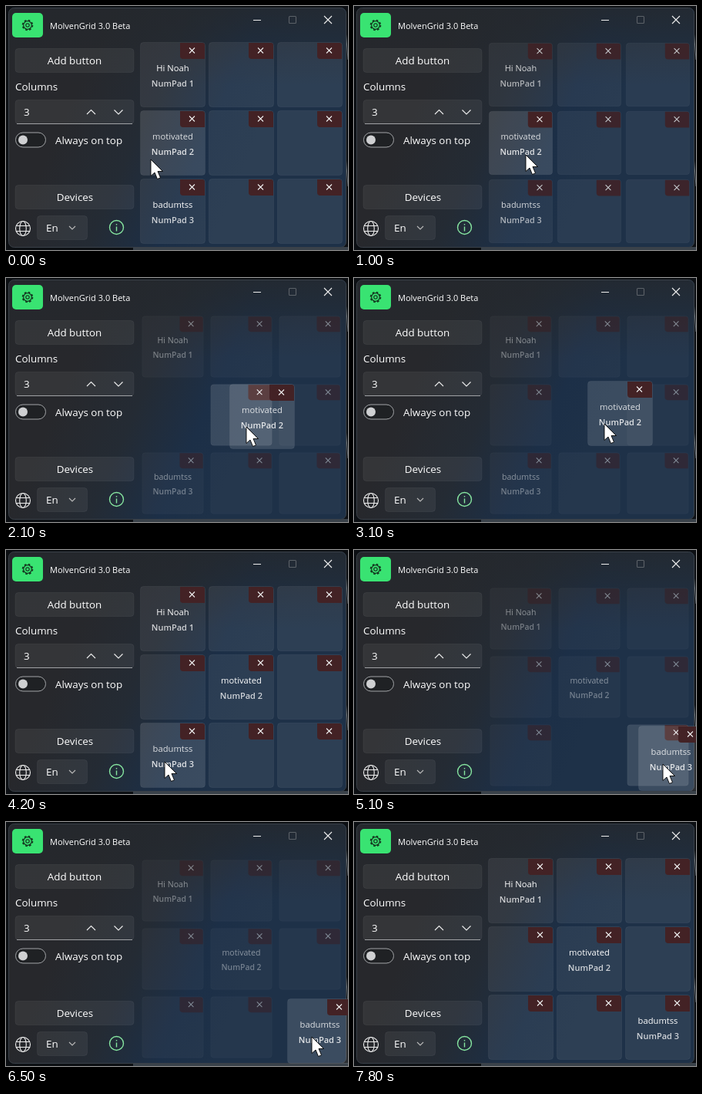
These frames come from a looping animation (444 by 318 pixels, 8 s). An HTML page:

```html
<!DOCTYPE html>
<html lang="en">
<head>
<meta charset="utf-8">
<title>Button deck</title>
<style>
  html, body { margin: 0; width: 100%; height: 100%; overflow: hidden; background: #0c0f13; }
  svg { display: block; font-family: "Open Sans", "Noto Sans", sans-serif; fill: #fff; }
  .mid { text-anchor: middle; }
  .ui { font-size: 13.4px; }
  .box { fill: #fff; fill-opacity: .06; stroke: #fff; stroke-opacity: .05; }
  .line { fill: none; stroke: #eee; stroke-width: 1.1; }
  .tile text { font-size: 11.2px; text-anchor: middle; }
  .tile .key { font-size: 11px; font-weight: 600; }
</style>
</head>
<body>
<svg width="444" height="318" viewBox="0 0 444 318">
  <defs>
    <linearGradient id="bg" gradientUnits="userSpaceOnUse" x1="90" y1="112" x2="310" y2="208">
      <stop offset="0" stop-color="#27282c"/>
      <stop offset=".4" stop-color="#242b34"/>
      <stop offset=".75" stop-color="#1c2f47"/>
      <stop offset="1" stop-color="#1e3148"/>
    </linearGradient>
    <linearGradient id="top" x2="0" y2="1">
      <stop offset="0" stop-color="#24282d" stop-opacity=".8"/>
      <stop offset="1" stop-color="#24282d" stop-opacity="0"/>
    </linearGradient>
  </defs>

  <path d="M165 314H444V318H165Z" fill="#3a424a"/>
  <path d="M441 30L444 70M441 195L444 235" stroke="#6d757c"/>
  <rect x="3.5" y="2.5" width="438" height="312" rx="7" fill="url(#bg)" stroke="#3a4149"/>
  <rect x="4" y="3" width="437" height="100" rx="7" fill="url(#top)"/>

  <rect x="8" y="9" width="40" height="32" rx="5" fill="#39e372"/>
  <g fill="none" stroke="#14351f" transform="translate(28 25)">
    <circle r="5.3" stroke-width="1.2"/>
    <circle r="6.4" stroke-width="1.8" stroke-dasharray="2.6 2.427"/>
    <circle r="2.2" stroke-width="1.2"/>
  </g>
  <text x="57" y="30" font-size="11">MolvenGrid 3.0 Beta</text>
  <path class="line" d="M321 18.5H331M413 13L423 23M423 13L413 23"/>
  <rect class="line" x="367.500" y="13.500" width="9" height="9" rx="1" style="stroke:#5c6268"/>

  <g class="ui">
    <rect class="box" x="12" y="55.500" width="154" height="31" rx="4"/>
    <text class="mid" x="89" y="76">Add button</text>
    <text x="12" y="110">Columns</text>
    <rect class="box" x="12" y="122.500" width="154" height="31" rx="4"/>
    <path d="M14 153.500H164" stroke="#a0a2a5"/>
    <text x="23" y="143">3</text>
    <path class="line" d="M105 141L110.500 135.500L116 141M140.500 135.500L146 141L151.500 135.500"/>
    <rect x="12.500" y="165" width="39" height="19" rx="9.500" fill="#1f2124" stroke="#a3a5a8"/>
    <circle cx="22" cy="174.500" r="6" fill="#cfd0d2"/>
    <text x="64" y="180">Always on top</text>
    <rect class="box" x="12" y="233.500" width="154" height="31" rx="4"/>
    <text class="mid" x="89.500" y="254">Devices</text>
    <g class="line" transform="translate(22 290)">
      <circle r="9.500"/><ellipse rx="4.300" ry="9.500"/>
      <path d="M-8.800 -3.500H8.800M-8.800 3.500H8.800"/>
    </g>
    <rect class="box" x="40.500" y="273.500" width="65" height="31" rx="4"/>
    <text x="52" y="294">En</text>
    <path class="line" d="M82 287L86 291L90 287" style="stroke:#bbb"/>
    <g transform="translate(143.500 288.500)" stroke="#86e5a0" fill="none" stroke-width="1.400">
      <circle r="9"/><path d="M0 -1V5M0 -4.500V-3"/>
    </g>
  </g>

  <g id="tiles"></g>
  <path id="cursor" d="M0 0V21.500L5 17L8.500 25.500L12.500 23.800L9 15.500H15.500Z" stroke="#000" stroke-width=".9"/>
</svg>
<script>
const LOOP = 8000, STEP = 100, PITCH = 89, SIZE = 85;
const labels = { 0: ['Hi Noah', 1], 3: ['motivated', 2], 6: ['badumtss', 3] };

// Tile that is carried, its fade start, drop time, grab offset and columns travelled
const drags = [
  { id: 3, start: 900, drop: 3300, dx: 22, dy: 56, cols: 1 },
  { id: 6, start: 4400, drop: 6600, dx: 32, dy: 50, cols: 2 }
];
// When each displaced tile slides one column left
const slides = { 4: 2350, 7: 4750, 8: 5400 };

// Cursor: time, x, y
const path = [
  [0, 188, 200], [700, 196, 193], [900, 207, 193], [1000, 223, 194], [1500, 272, 194],
  [1800, 304, 194], [1900, 306, 194], [2000, 306, 194], [2100, 312, 194], [2500, 338, 190],
  [2900, 325, 190], [3300, 325, 190], [4100, 206, 276], [4400, 206, 276], [5100, 401, 279],
  [5500, 395, 270], [5900, 397, 280], [6600, 397, 280], [7100, 391, 276], [7200, 391, 276],
  [7300, 388, 274], [7400, 388, 274], [7500, 384, 270], [LOOP, 384, 270]
];

const clamp = v => Math.max(0, Math.min(1, v));
const ease = v => 1 - (1 - clamp(v)) ** 2;

function cursorAt(t) {
  const i = path.findIndex(p => p[0] > t);
  const [a, b] = [path[i - 1], path[i]], k = (t - a[0]) / (b[0] - a[0]);
  return [a[1] + (b[1] - a[1]) * k, a[2] + (b[2] - a[2]) * k];
}

const layer = document.getElementById('tiles');
const cursor = document.getElementById('cursor');

function makeTile(id) {
  const g = document.createElementNS('http://www.w3.org/2000/svg', 'g');
  const [name, key] = labels[id] || [];
  g.setAttribute('class', 'tile');
  g.innerHTML = `
    <rect class="box" x=".5" y=".5" width="84" height="84" rx="4"/>
    <path d="M52 1H81Q84 1 84 4V22H56Q52 22 52 18Z" fill="#432225"/>
    <path class="line" d="M64 7.500L71 14.500M71 7.500L64 14.500"/>` +
    (name ? `<text class="name" x="42.500" y="38">${name}</text>
    <text class="key" x="42.500" y="58">NumPad ${key}</text>` : '');
  layer.append(g);
  return { id, g, box: g.querySelector('rect'), name: g.querySelector('.name'), key: g.querySelector('.key') };
}
// Carried tiles come last so that they lie on top
const tiles = [0, 1, 2, 4, 5, 7, 8, 3, 6].map(makeTile);

function draw(t) {
  const [mx, my] = cursorAt(t), shown = t < 7800;
  cursor.setAttribute('transform', `translate(${mx} ${my})`);
  cursor.style.display = shown ? '' : 'none';
  const fade = Math.max(...drags.map(d =>
    ease((t - d.start) / 500) * (1 - ease((t - d.drop) / 400))));

  for (const { id, g, box, name, key } of tiles) {
    const drag = drags.find(d => d.id === id);
    const carried = drag && t > drag.start + 100 && t < drag.drop;
    let x = 174 + id % 3 * PITCH, y = 47 + Math.floor(id / 3) * PITCH;
    if (slides[id]) x -= PITCH * ease((t - slides[id]) / 250);
    if (drag && t >= drag.drop) x += PITCH * drag.cols;
    if (carried) [x, y] = [mx - drag.dx, my - drag.dy];

    const hover = carried || shown && mx >= x && mx < x + SIZE && my >= y && my < y + SIZE;
    const scale = carried ? 1 : 1 - .055 * fade, pad = SIZE * (1 - scale) / 2;
    g.setAttribute('transform', `translate(${x + pad} ${y + pad}) scale(${scale})`);
    g.style.opacity = hover ? 1 : 1 - .52 * fade;
    box.style.fillOpacity = hover ? .13 : .065;
    if (name) {
      name.style.opacity = hover ? .82 : 1;
      key.style.opacity = hover ? .84 : .77;
    }
  }
}

function frame() {
  draw(Math.floor(performance.now() / STEP) * STEP % LOOP);
  requestAnimationFrame(frame);
}
frame();
</script>
</body>
</html>
```
